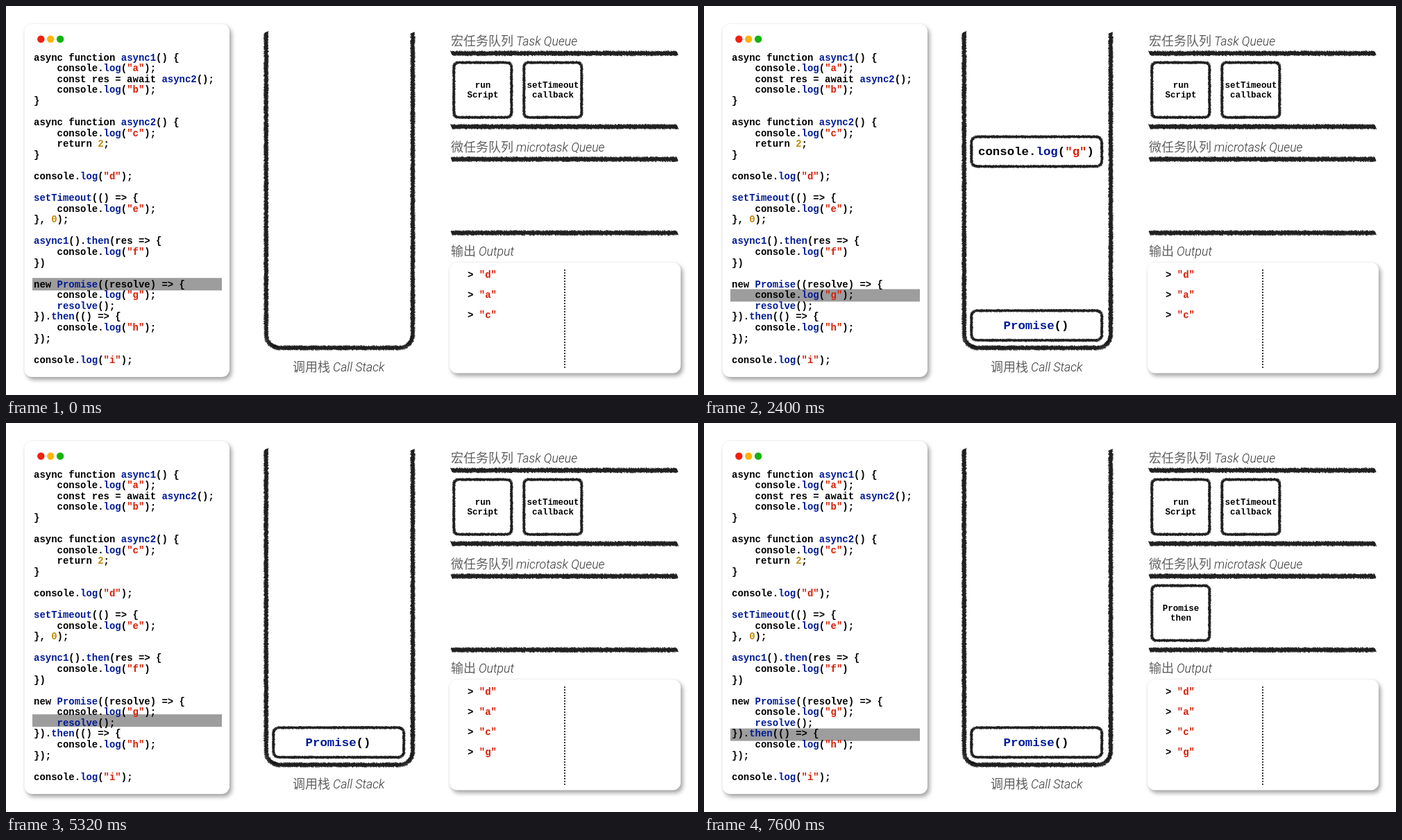
Write an HTML page that moves like this. It is 997x561 px and loops after 8080 ms.

```html
<!DOCTYPE html>
<html lang="zh-CN">
<head>
<meta charset="utf-8">
<title>Call Stack</title>
<style>
  html, body { margin: 0; width: 100%; height: 100%; overflow: hidden; background: #fff; }
  svg { display: block; }
  text { white-space: pre; }
  .code { font-family: "Liberation Mono", "Courier New", monospace; font-weight: 700; fill: #000; }
  .zh { font: 300 18px "Noto Sans CJK SC", "Noto Sans CJK", sans-serif; fill: #606060; }
  .en { font: italic 300 17.7px Roboto, "Liberation Sans", sans-serif; fill: #383838; }
  .card { fill: #fff; filter: drop-shadow(3px 4px 3px rgba(0,0,0,.34)) drop-shadow(0 0 1px rgba(0,0,0,.1)); }
</style>
</head>
<body>
<svg id="stage" width="997" height="561" viewBox="0 0 997 561"></svg>
<script>
const NS = "http://www.w3.org/2000/svg";
const stage = document.getElementById("stage");
const BLUE = "#001a96", RED = "#d81e06", GOLD = "#c48a0a";
const LOOP = 8080, STEP = 40, ROW = 15.57;

const CODE = `async function async1() {
    console.log("a");
    const res = await async2();
    console.log("b");
}

async function async2() {
    console.log("c");
    return 2;
}

console.log("d");

setTimeout(() => {
    console.log("e");
}, 0);

async1().then(res => {
    console.log("f")
})

new Promise((resolve) => {
    console.log("g");
    resolve();
}).then(() => {
    console.log("h");
});

console.log("i");`;

function add(tag, attrs, parent = stage) {
  const el = document.createElementNS(NS, tag);
  for (const k in attrs) el.setAttribute(k, attrs[k]);
  return parent.appendChild(el);
}

function label(str, attrs, parent) {
  const el = add("text", attrs, parent);
  el.textContent = str;
  return el;
}

// Monospaced text with syntax colours
function code(str, x, y, size, parent) {
  const el = add("text", { x, y, class: "code", "font-size": size }, parent);
  const tokens = /("\w"|\b[02]\b|\b(?:async[12]|log|setTimeout|then|Promise|resolve(?=\())\b)/;
  str.split(tokens).forEach((part, i) => {
    if (!part) return;
    const fill = i % 2 === 0 ? "#000" : part[0] === '"' ? RED : /^\d/.test(part) ? GOLD : BLUE;
    add("tspan", { fill }, el).textContent = part;
  });
  return el;
}

let seed = 7;
function rand() {
  seed = (seed * 16807) % 2147483647;
  return seed / 2147483647;
}

// Charcoal line: short slanted hatches of random reach across a path
function rough(d, width, parent) {
  const line = add("path", { d, fill: "none" }, parent);
  const len = line.getTotalLength();
  let out = "";
  for (let s = 0; s < len - 0.5; s += 0.6) {
    const p = line.getPointAtLength(s), q = line.getPointAtLength(s + 0.5);
    const tx = (q.x - p.x) * 2, ty = (q.y - p.y) * 2;
    const a = width * (0.28 + 0.28 * rand()), b = width * (0.28 + 0.28 * rand());
    const k = 0.4;
    out += `M${(p.x - ty * a + tx * a * k).toFixed(1)} ${(p.y + tx * a + ty * a * k).toFixed(1)}` +
           `L${(p.x + ty * b - tx * b * k).toFixed(1)} ${(p.y - tx * b - ty * b * k).toFixed(1)}`;
  }
  line.setAttribute("d", out);
  line.setAttribute("stroke", "#0c0c0c");
  line.setAttribute("stroke-width", 0.9);
}

function roughBox(x, y, w, h, r, parent) {
  rough(`M${x + r} ${y}h${w - 2 * r}a${r} ${r} 0 0 1 ${r} ${r}v${h - 2 * r}` +
        `a${r} ${r} 0 0 1 ${-r} ${r}h${2 * r - w}a${r} ${r} 0 0 1 ${-r} ${-r}` +
        `v${2 * r - h}a${r} ${r} 0 0 1 ${r} ${-r}`, 4.3, parent);
}

function card(x, y, width, height) {
  add("rect", { x, y, width, height, rx: 11, class: "card" });
}

function heading(zh, en, x, y) {
  label(zh, { x, y, class: "zh" });
  label(en, { x: x + zh.length * 18 + 4, y: y - 0.5, class: "en" });
}

function taskBox(x, y, lines) {
  const g = add("g", {});
  roughBox(x, y, 83, 79, 6, g);
  lines.forEach((str, i) => label(str, {
    x: x + 41.8, y: y + 36.2 + i * 14, class: "code", "font-size": 12.5, "text-anchor": "middle"
  }, g));
  return g;
}

function stackBox(str) {
  const g = add("g", {});
  roughBox(385.3, 439.3, 187.9, 42.8, 8, g);
  code(str, 478.5 - str.length * 5.22, 465.5, 17.4, g);
  return g;
}

function output(ch, i) {
  return code(`> "${ch}"`, 665, 391.6 + i * 29.1, 14);
}

// Code panel
card(26.5, 26, 295.5, 509);
["#f0200c", "#fdb408", "#14b40c"].forEach((fill, i) =>
  add("circle", { cx: 50.3 + i * 13.9, cy: 47.8, r: 5.2, fill }));
const bar = add("rect", { x: 38, y: 392.2, width: 273, height: 18, fill: "#9d9d9d" });
CODE.split("\n").forEach((str, i) => code(str, 40, 78.7 + i * ROW, 13.97));

// Call stack
rough("M374.8 38V474a19 19 0 0 0 19 19H567a19 19 0 0 0 19 -19V38", 6.8);
heading("调用栈", "Call Stack", 413, 527);

// Queues
[68.3, 174, 221, 327.2].forEach(y => rough(`M642 ${y}H968`, 7.3));
heading("宏任务队列", "Task Queue", 641, 57);
heading("微任务队列", "microtask Queue", 641, 210);
taskBox(645.3, 81.6, ["run", "Script"]);
taskBox(746.3, 81.6, ["setTimeout", "callback"]);
const thenBox = taskBox(645.3, 234.6, ["Promise", "then"]);

// Output panel
heading("输出", "Output", 641, 360);
card(639, 370, 333, 159.5);
add("path", { d: "M805 380V522", stroke: "#222", "stroke-width": 1.8, "stroke-dasharray": "2 2" });
["d", "a", "c"].forEach(output);
const outG = output("g", 3);

const promiseBox = stackBox("Promise()");
const logBox = stackBox('console.log("g")');

const span = (t, start, dur) => Math.min(1, Math.max(0, (t - start) / dur));
const easeIn = p => p * p;
const easeOut = p => 1 - (1 - p) * (1 - p);
const smooth = p => p * p * (3 - 2 * p);

function place(el, x, y, shown) {
  el.setAttribute("transform", `translate(${x.toFixed(2)} ${y.toFixed(2)})`);
  el.setAttribute("visibility", shown ? "visible" : "hidden");
}

function draw(t) {
  const steps = smooth(span(t, 1035, 840)) + smooth(span(t, 4770, 830)) + smooth(span(t, 6170, 820));
  bar.setAttribute("y", (392.2 + steps * 16.1).toFixed(2));

  place(promiseBox, 0, -486 * (1 - easeOut(span(t, 500, 560))), t > 500);

  const drop = easeOut(span(t, 2220, 560)), lift = easeIn(span(t, 3430, 506));
  place(logBox, 0, -50 - 436 * (1 - drop + lift), t > 2220 && t < 3960);
  outG.setAttribute("opacity", span(t, 2800, 360).toFixed(3));

  place(thenBox, 355 * (1 - easeOut(span(t, 7010, 580))), 0, t > 7010);
}

const begin = performance.now();
function tick() {
  const t = (performance.now() - begin) % LOOP;
  draw(Math.floor(t / STEP) * STEP);
  requestAnimationFrame(tick);
}
tick();
</script>
</body>
</html>
```
